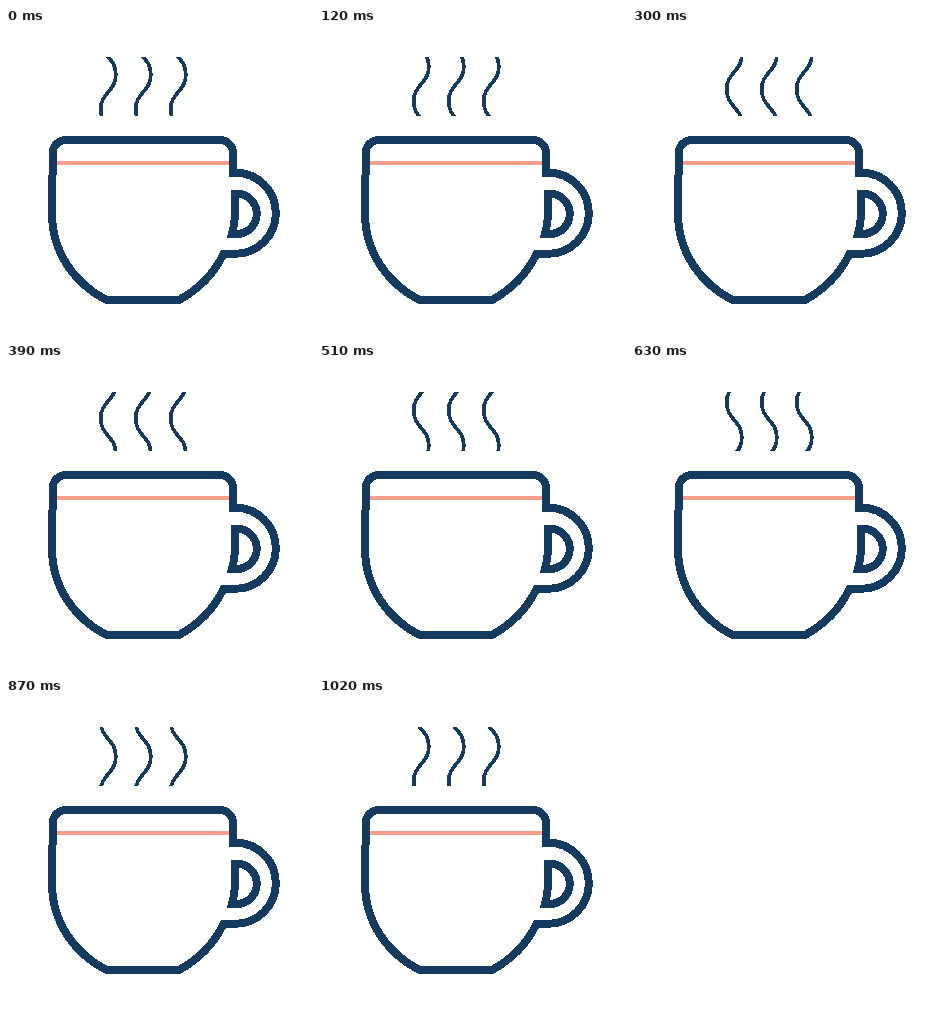
Recreate the animation shown at these times as an HTML page. Size 307 by 307 pixels, loop 1.05 s.

```html
<!DOCTYPE html>
<html lang="en">
<head>
<meta charset="utf-8">
<title>Steaming cup</title>
<style>
  html, body { margin: 0; width: 100%; height: 100%; overflow: hidden; background: #fff; }
  svg { display: block; width: 100vw; height: 100vh; shape-rendering: crispEdges; }
  .ink { fill: none; stroke: #143a60; stroke-width: 8; stroke-miterlimit: 6; }
  .steam { stroke-width: 3.7; }
</style>
</head>
<body>
<svg viewBox="0 0 307 307">
  <clipPath id="window"><rect x="80" y="29" width="120" height="59"/></clipPath>
  <path d="M50 135H224" fill="none" stroke="#f79c88" stroke-width="4"/>
  <path class="ink" d="M217.5 225.8 C208 246 193 261 173 272 H100.5
    C66 254 46 222 46 185 L46.8 125 A13 13 0 0 1 59.8 112 H214 A13 13 0 0 1 227 125
    V144.7 H229.3 A40.55 40.55 0 0 1 229.3 225.8 Z"/>
  <path class="ink" d="M229 165.6 H230.6 A20.2 20.2 0 0 1 230.6 206 H226 Q229 196 229 185 Z"/>
  <g clip-path="url(#window)"><path id="steam" class="ink steam"/></g>
</svg>
<script>
  const LOOP = 1050, STEPS = 35;
  const LEFT = 94.7, RIGHT = 109.8, GAP = 35;
  const HALF = 35, TOP = 11.5;
  const steam = document.getElementById('steam');

  // One wavy line, alternating between its left and right extremes.
  function wave(dx) {
    let d = `M${LEFT + dx} ${TOP}`;
    for (let i = 0; i < 5; i++) {
      const [a, b] = i % 2 ? [RIGHT, LEFT] : [LEFT, RIGHT];
      const y = TOP + i * HALF, mid = y + HALF / 2;
      d += `C${a + dx} ${mid} ${b + dx} ${mid} ${b + dx} ${y + HALF}`;
    }
    return d;
  }

  steam.setAttribute('d', [0, GAP, 2 * GAP].map(wave).join(''));
  // The wave rises by one full wavelength per loop.
  steam.animate(
    [{ transform: 'translateY(0px)' }, { transform: `translateY(${-2 * HALF}px)` }],
    { duration: LOOP, iterations: Infinity, easing: `steps(${STEPS}, end)` }
  );
</script>
</body>
</html>
```
